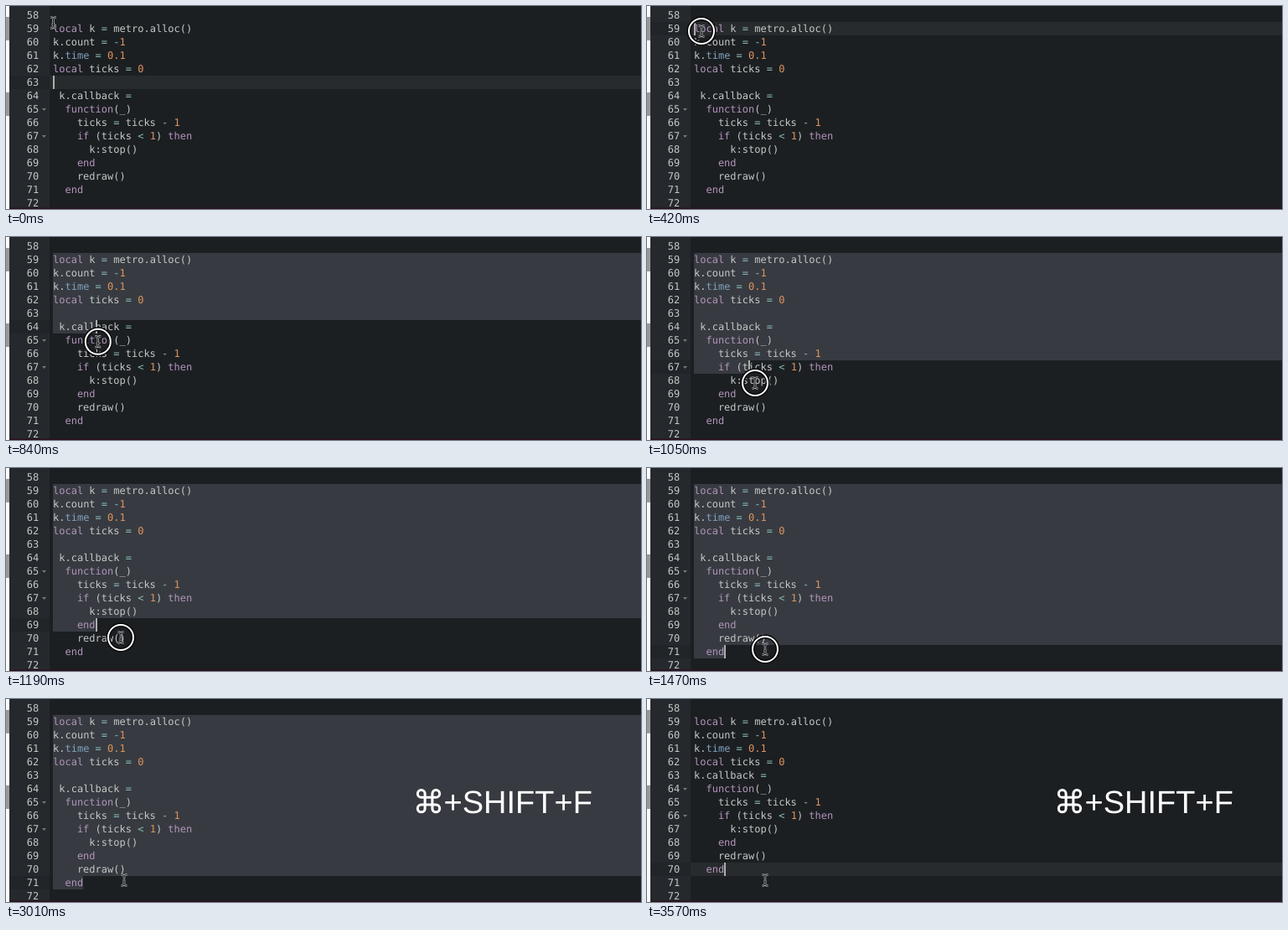
Animation, 758 px wide and 242 px high, one loop 3.71 s. Source, as an HTML page:

```html
<!DOCTYPE html>
<html lang="en">
<head>
<meta charset="utf-8">
<title>Code editor: select and format</title>
<style>
  html, body { margin: 0; width: 100%; height: 100%; overflow: hidden; background: #1c1f22; }
  svg { display: block; width: 758px; height: 242px; }
  .code text { font: 12px "DejaVu Sans Mono", monospace; fill: #c5c8c6; white-space: pre; text-rendering: geometricPrecision; }
  .code .key { fill: #b294bb; }
  .code .op { fill: #8abeb7; }
  .code .num { fill: #de935f; }
  .code .fn { fill: #81a2be; }
  .keys { font: 38px "Liberation Sans", Arial, sans-serif; fill: #fff; text-rendering: geometricPrecision; }
</style>
</head>
<body>
<svg viewBox="0 0 758 242">
  <rect width="758" height="242" fill="#1c1f22"/>
  <rect x="4" width="48" height="242" fill="#25282c"/>
  <rect id="gutterRow" x="4" width="48" height="16" fill="#212428"/>
  <rect id="activeRow" x="52" width="706" height="16" fill="#282b2d"/>
  <path id="selection" fill="#373b41"/>
  <g class="code">
    <g id="numbers"></g>
    <g id="before"></g>
    <g id="after"></g>
  </g>
  <rect id="caret" width="2" height="16" fill="#aeafad"/>
  <rect y="240.6" x="4" width="754" height="1.4" fill="#2b101b"/>
  <rect width="4" height="242" fill="#fff"/>
  <path d="M0 13h4v28h-4zM0 103h4v28h-4z" fill="#999"/>
  <g id="mouse" fill="none">
    <g id="ring">
      <circle r="15" stroke="#08090a" stroke-width="5"/>
      <circle r="15" stroke="#fff" stroke-width="2"/>
    </g>
    <path id="beam" d="M-3.5 -6.5Q0 -6.5 0 -4Q0 -6.5 3.5 -6.5M0 -4V4M-3.5 6.5Q0 6.5 0 4Q0 6.5 3.5 6.5M-2 2H2" stroke="#b4b6b8" stroke-width="2.4"/>
    <use href="#beam" style="display:none"/>
    <path d="M-3.5 -6.5Q0 -6.5 0 -4Q0 -6.5 3.5 -6.5M0 -4V4M-3.5 6.5Q0 6.5 0 4Q0 6.5 3.5 6.5M-2 2H2" stroke="#17191b" stroke-width="1"/>
  </g>
  <g id="shortcut">
    <path transform="translate(504.5 121.7) scale(1.46) translate(-12 -12)" fill="none" stroke="#fff" stroke-width="2.1"
      d="M18 3a3 3 0 0 0-3 3v12a3 3 0 1 0 3-3H6a3 3 0 1 0 3 3V6a3 3 0 1 0-3 3h12a3 3 0 1 0 0-6z"/>
    <text class="keys" x="522.5" y="135.5">+SHIFT+F</text>
  </g>
</svg>
<script>
const LOOP = 3710, STEP = 70, FIRST = 59, LAST = 71;
const LEFT = 56, CHAR = 7.224, ROW = 16;
const $ = id => document.getElementById(id);
const rowTop = n => 19 + (n - FIRST) * ROW;
const set = (el, attrs) => { for (const k in attrs) el.setAttribute(k, attrs[k]); };
const show = (id, on) => set($(id), { opacity: Number(on) });

const head = ["local k = metro.alloc()", "k.count = -1", "k.time = 0.1", "local ticks = 0"];
const body = [
  "  function(_)",
  "    ticks = ticks - 1",
  "    if (ticks < 1) then",
  "      k:stop()",
  "    end",
  "    redraw()",
  "  end"
];
const messy = [...head, "", " k.callback =", ...body];
const tidy = [...head, "k.callback =", ...body];

function add(parent, tag, attrs, text = "") {
  const el = document.createElementNS("http://www.w3.org/2000/svg", tag);
  set(el, attrs);
  el.textContent = text;
  parent.append(el);
  return el;
}

function kind(token) {
  if (/^(local|function|if|then|end)$/.test(token)) return "key";
  if (/^\d/.test(token)) return "num";
  if (/^[=<-]$/.test(token)) return "op";
  return token === "time" ? "fn" : "";
}

function drawCode(group, lines) {
  lines.forEach((line, i) => {
    const top = rowTop(FIRST + i);
    const indent = line.search(/\S|$/);
    const text = add(group, "text", { x: LEFT + indent * CHAR, y: top + 12 });
    for (const token of line.trim().match(/\d+(\.\d+)?|\w+|\s+|[^\w\s]/g) || [])
      add(text, "tspan", { class: kind(token) }, token);
    if (/function|if /.test(line))
      add(group, "path", { d: `M43 ${top + 7}h5l-2.5 3z`, fill: "#75797d" });
  });
}

for (let n = 58; n <= 72; n++)
  add($("numbers"), "text", { x: 39.3, y: rowTop(n) + 12, "text-anchor": "end" }, n);
drawCode($("before"), messy);
drawCode($("after"), tidy);

// time, x, y of the pointer
const path = [
  [210, 56.5, 20], [350, 59, 23], [490, 71, 37], [560, 79, 53], [630, 88, 71], [700, 97, 92],
  [1050, 129, 174], [1190, 137, 202], [1260, 140, 212], [1400, 141, 216]
];

function pointer(t) {
  const i = path.findIndex(p => p[0] > t);
  if (i === 0) return path[0].slice(1);
  if (i < 0) return path[path.length - 1].slice(1);
  const [a, b] = [path[i - 1], path[i]];
  const f = (t - a[0]) / (b[0] - a[0]);
  return [a[1] + (b[1] - a[1]) * f, a[2] + (b[2] - a[2]) * f];
}

// The editor follows the pointer one step late.
function caretAt(t) {
  if (t < 210) return [63, 0];
  if (t >= 3220) return [70, 5];
  const [x, y] = pointer(t - STEP);
  const row = Math.min(LAST, FIRST + Math.max(0, Math.floor((y - 19) / ROW)));
  const col = Math.max(0, Math.round((x - LEFT) / CHAR));
  return [row, Math.min(col, messy[row - FIRST].length)];
}

function render(t) {
  const done = t >= 3220;
  const [row, col] = caretAt(t);
  const top = rowTop(row), x = LEFT + col * CHAR;
  const dragged = t >= 210 && !done;
  const multi = dragged && row > FIRST;

  set($("gutterRow"), { y: top });
  set($("activeRow"), { y: top });
  show("activeRow", !multi);
  set($("selection"), {
    d: !dragged ? "" : (multi ? `M${LEFT} 19H758V${top}H${LEFT}z` : "") + `M${LEFT} ${top}H${x}v${ROW}H${LEFT}z`
  });
  show("before", !done);
  show("after", done);

  set($("caret"), { x: Math.round(x), y: top });
  show("caret", !(t >= 1960 && t < 2380 || t >= 2940 && !done));

  const [mx, my] = pointer(t);
  set($("mouse"), { transform: `translate(${mx} ${my})` });
  show("ring", t < 210 || t >= 2030 ? 0 : t >= 1960 ? 0.5 : 1);
  show("shortcut", t < 2940 ? 0 : t < 3010 ? 0.5 : 1);
}

const start = performance.now();
function tick() {
  const t = (performance.now() - start) % LOOP;
  render(Math.floor(t / STEP) * STEP);
  requestAnimationFrame(tick);
}
tick();
</script>
</body>
</html>
```
